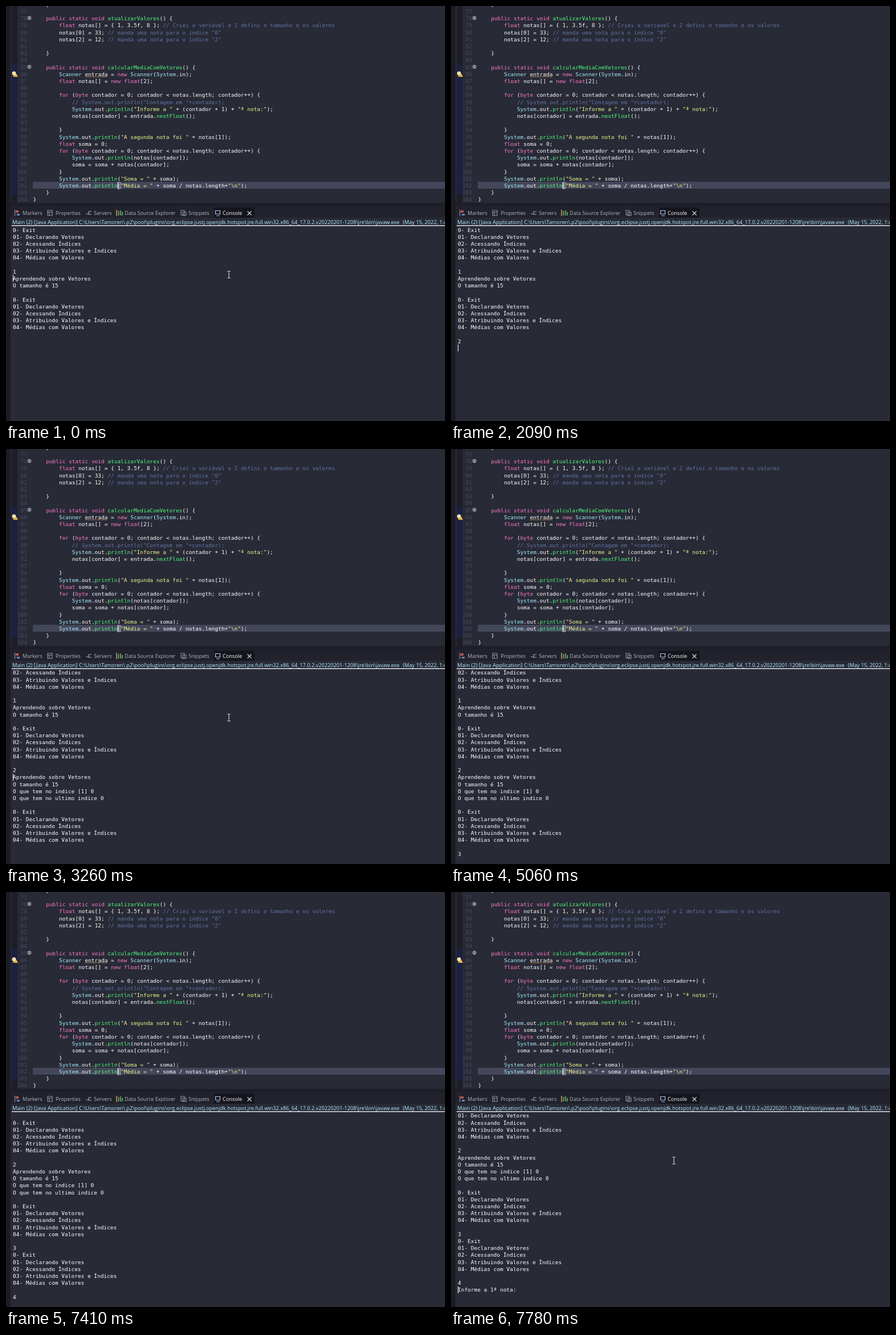
Write an HTML page that moves like this. It is 770 px wide and 727 px high and loops after 8 s.

```html
<!DOCTYPE html>
<html lang="pt">
<head>
<meta charset="utf-8">
<title>Console</title>
<style>
  html, body { margin: 0; width: 100%; height: 100%; overflow: hidden; background: #282a36; }
  svg { display: block; width: 770px; height: 727px; }
  text { white-space: pre; fill: #fff; }
  .mono { font: 9.46px "DejaVu Sans Mono", "Noto Sans Mono", monospace; }
  .ui { font: 9.1px "Open Sans", "Noto Sans", sans-serif; }
  .ui text { fill: #b4b6be; }
  .ui .active { fill: #fff; }
  .path { font-size: 9.2px; }
  .path .title { font-size: 9.45px; }
  .ui .path text { fill: #b5f0ff; }
  .number { fill: #484b5e; text-anchor: end; }
  .comment { fill: #6272a4; }
  .string { fill: #f1fa8c; }
  .keyword { fill: #ff79c6; }
  .type { fill: #a4ecfb; }
  .method { fill: #50fa7b; }
</style>
</head>
<body>
<svg viewBox="0 0 770 727">
  <defs><clipPath id="view"><rect x="8" y="386" width="762" height="341"/></clipPath></defs>
  <rect width="770" height="727" fill="#282a36"/>
  <rect width="8" height="727" fill="#1b1c26"/>

  <rect x="10" width="10" height="345" fill="#1d1e27"/>
  <rect x="10" y="101" width="10" height="229" fill="#1b2140"/>
  <rect x="47" y="308" width="723" height="12" fill="#44475a"/>
  <g id="code" class="mono"></g>
  <path id="squiggle" fill="none" stroke="#d9944a" stroke-width=".7"/>
  <path d="M196 309.5h5v10.5h-5z" fill="none" stroke="#d5d6dc" stroke-width=".8"/>
  <path d="M196.5 308.5v12" stroke="#fff"/>
  <g stroke="#3a3c48" fill="#9b9da8">
    <circle cx="41" cy="21" r="3.7"/><circle cx="41" cy="106.5" r="3.7"/>
    <path d="M39 21h4M39 106.5h4"/>
  </g>
  <circle cx="14" cy="118" r="3.4" fill="#f6e2b0"/>
  <path d="M12.5 121h3v3h-3z" fill="#b9a26a"/>
  <path d="M17.5 117.5l3.5 6.5h-7z" fill="#f0b63c"/>

  <rect x="8" y="345" width="762" height="6" fill="#1d1e27"/>
  <rect x="8" y="351" width="762" height="20" fill="#21222c"/>
  <rect x="365" y="353" width="71" height="18" fill="#15161d"/>
  <g class="ui">
    <g id="tabs"></g>
    <g class="path">
      <text x="11" y="381.5" class="title">Main (2) [Java Application]</text>
      <text x="128" y="381.5">C:\Users\Tamoren\.p2\pool\plugins\org.eclipse.justj.openjdk.hotspot.jre.full.win32.x86_64_17.0.2.v20220201-1208\jre\bin\javaw.exe</text>
      <text x="696" y="381.5">(May 15, 2022, 1:42:10 PM)</text>
    </g>
  </g>
  <g fill="none" stroke-width="1.2">
    <path d="M15.5 357v11" stroke="#8d909c"/>
    <path d="M17 358h5v4h-5z" fill="#b4575a" stroke="none"/>
    <path d="M19 364h5v3h-5z" fill="#6d87b8" stroke="none"/>
    <path d="M73 358h8v9h-8zM73 361h8M76 361v6" stroke="#8d909c"/>
    <path d="M140 364h5v-4h5M144 365h6" stroke="#9aa7a9"/>
    <path d="M194 357v11M197.5 359v8" stroke="#8f8a5c" stroke-width="2"/>
    <path d="M201 358v9M204 361v6" stroke="#4f9a62" stroke-width="2"/>
    <path d="M307 358h6v8h-6zM310 361h6v6h-6z" stroke="#8d909c"/>
    <path d="M367.5 358.5h8v6h-8zM369 367.5h6" stroke="#a9c8ee"/>
    <path d="M423.5 359.5l7 7m0-7l-7 7" stroke="#d8d9df"/>
  </g>
  <rect x="10" y="384" width="760" height="1.4" fill="#eceef2"/>

  <g clip-path="url(#view)">
    <g id="log" class="mono">
      <rect id="caret" x="12" width="1" height="12" fill="#fff"/>
    </g>
  </g>
  <path id="mouse" d="M388.5 464.5h2l.5.5.5-.5h2M391 465v11.5M388.5 476.5h2l.5-.5.5.5h2" fill="none" stroke="#eceef2"/>
</svg>
<script>
const PITCH = 12.2, CHAR = 5.694, LOOP = 8000;
const $ = id => document.getElementById(id);

function add(parent, tag, attrs, content = "") {
  const node = document.createElementNS("http://www.w3.org/2000/svg", tag);
  for (const key in attrs) node.setAttribute(key, attrs[key]);
  node.textContent = content;
  parent.append(node);
  return node;
}

const source = String.raw`    }

    public static void atualizarValores() {
        float notas[] = { 1, 3.5f, 8 }; // Criei a variável e 2 defini o tamanho e os valores
        notas[0] = 33; // manda uma nota para o índice "0"
        notas[2] = 12; // manda uma nota para o índice "2"

    }

    public static void calcularMediaComVetores() {
        Scanner entrada = new Scanner(System.in);
        float notas[] = new float[2];

        for (byte contador = 0; contador < notas.length; contador++) {
            // System.out.println("Contagem em "+contador);
            System.out.println("Informe a " + (contador + 1) + "ª nota:");
            notas[contador] = entrada.nextFloat();

        }
        System.out.println("A segunda nota foi " + notas[1]);
        float soma = 0;
        for (byte contador = 0; contador < notas.length; contador++) {
            System.out.println(notas[contador]);
            soma = soma + notas[contador];
        }
        System.out.println("Soma = " + soma);
        System.out.println("Média = " + soma / notas.length+"\n");
    }
}`;

const token = new RegExp([
  /(?<comment>\/\/.*)/, /(?<string>"[^"]*")/,
  /(?<keyword>\b(?:public|static|void|float|new|for|byte)\b)/,
  /(?<type>\b(?:Scanner|System)\b)/, /(?<method>\b\w+(?=\())/, /(?<plain>\w+|.)/
].map(r => r.source).join("|"), "gu");

source.split("\n").forEach((line, i) => {
  const number = 76 + i, y = 318 + (number - 102) * PITCH;
  if (i) add($("code"), "text", { x: 37, y, class: "number" }, number);
  const indent = line.search(/\S|$/);
  const row = add($("code"), "text", { x: 47.4 + indent * CHAR, y });
  for (const { groups } of line.slice(indent).matchAll(token)) {
    const [kind, value] = Object.entries(groups).find(([, v]) => v !== undefined);
    add(row, "tspan", { class: kind }, value);
  }
});

let wave = "M138.5 125";
for (let x = 0; x < 39; x += 3) wave += "l1.5-1.5l1.5 1.5";
$("squiggle").setAttribute("d", wave);

const tabs = { Markers: 29, Properties: 87, Servers: 154, "Data Source Explorer": 208, Snippets: 320, Console: 380 };
for (const name in tabs)
  add($("tabs"), "text", { x: tabs[name], y: 366, class: name === "Console" ? "active" : "" }, name);

const menu = ["0- Exit", "01- Declarando Vetores", "02- Acessando Índices",
  "03- Atribuindo Valores e Índices", "04- Médias com Valores", ""];
const intro = ["Aprendendo sobre Vetores", "O tamanho é 15"];
const rows = [...menu, "1", ...intro, "", ...menu, "2", ...intro,
  "O que tem no indice [1] 0", "O que tem no ultimo indice 0", "",
  ...menu, "3", ...menu, "4", "Informe a 1ª nota:"
].map((value, i) => add($("log"), "text", { x: 12, y: 395.5 + i * PITCH }, value));

// Each step changes only the listed values; caret is switched on unless given.
const on = {}, off = { caret: 0 };
const steps = [
  [0, { top: 0, count: 15, line: 7, col: 0, mouse: 1 }],
  [150, off], [650, on], [1150, off],
  [1410, { count: 17, line: 16, col: 1, mouse: 0 }],
  [1550, { mouse: 1 }], [1960, off],
  [2090, { line: 17, col: 0, mouse: 0 }],
  [2220, { top: 2, count: 27, mouse: 1 }],
  [2760, off], [3260, on], [3890, off], [4420, on],
  [4560, { count: 29, line: 28, col: 1, mouse: 0 }],
  [5060, off],
  [5210, { top: 9, count: 34, line: 29, col: 0, mouse: 1 }],
  [5710, off], [6270, on], [6770, off],
  [6890, { count: 36, line: 35, col: 1, mouse: 0 }],
  [7410, off],
  [7660, { top: 9.13, line: 36, col: 0, mouse: 1 }],
  [7780, { top: 11, count: 37 }]
];
let last = {};
const states = steps.map(([time, change]) => last = { ...last, caret: 1, ...change, time });

function show(node, visible) { node.style.visibility = visible ? "visible" : "hidden"; }

let current;
function draw() {
  const now = performance.now() % LOOP;
  const state = states.findLast(s => s.time <= now);
  if (state !== current) {
    current = state;
    const shift = -state.top * PITCH;
    $("log").setAttribute("transform", `translate(0 ${shift})`);
    rows.forEach((row, i) => show(row, i < state.count && i >= Math.floor(state.top)));
    $("caret").setAttribute("x", 12 + state.col * 6);
    $("caret").setAttribute("y", Math.round(386 + state.line * PITCH + shift) - shift);
    show($("caret"), state.caret);
    show($("mouse"), state.mouse);
  }
  requestAnimationFrame(draw);
}
draw();
</script>
</body>
</html>
```
